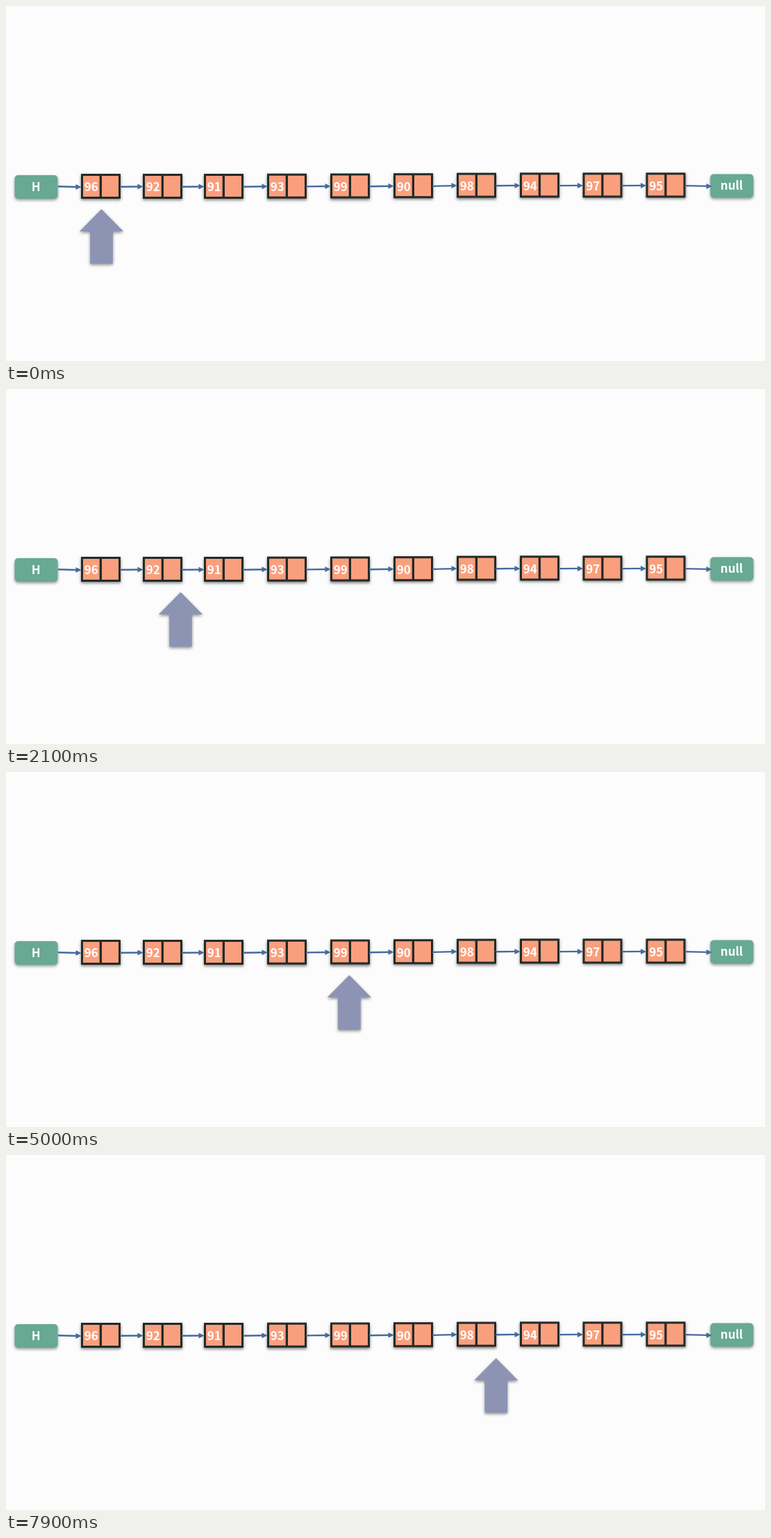
An HTML page with a canvas for the animation above (8000 ms loop, 1093 by 512 pixels).

```html
<!DOCTYPE html>
<html lang="en">
<head>
<meta charset="utf-8">
<title>Linked list traversal</title>
<style>
  html, body { margin: 0; width: 100%; height: 100%; overflow: hidden; background: #fcfcfc; }
  canvas { display: block; }
</style>
</head>
<body>
<canvas id="stage" width="1093" height="512"></canvas>
<script>
const ctx = document.getElementById('stage').getContext('2d');

const LOOP = 8000;
const STEP = 100;
const MOVE = 1000;
const BOX_W = 57;
const BOX_H = 36;
const FONT = '"Noto Sans CJK SC", "Noto Sans CJK JP", "Noto Sans", sans-serif';

const nodes = [
  { value: 96, x: 108, y: 242 },
  { value: 92, x: 197, y: 242 },
  { value: 91, x: 285, y: 242 },
  { value: 93, x: 376, y: 241.7 },
  { value: 99, x: 467, y: 241.5 },
  { value: 90, x: 558, y: 241.2 },
  { value: 98, x: 649, y: 240.6 },
  { value: 94, x: 740, y: 240.4 },
  { value: 97, x: 830.5, y: 240.4 },
  { value: 95, x: 921.5, y: 240.4 }
];

// Pointer rest positions and the time each hop to the next one begins.
const stops = [137.5, 225.5, 313.2, 405.2, 495, 586.5, 677.5, 768.5];
const starts = [506, 1715, 2940, 4060, 5250, 6431, 7506];

function withShadow(alpha, blur, offset, draw) {
  ctx.save();
  ctx.shadowColor = `rgba(0, 0, 0, ${alpha})`;
  ctx.shadowBlur = blur;
  ctx.shadowOffsetY = offset;
  draw();
  ctx.restore();
}

function label(text, x, baseline) {
  ctx.font = `bold 17px ${FONT}`;
  ctx.textAlign = 'center';
  ctx.fillStyle = '#fff';
  ctx.fillText(text, x, baseline);
}

function drawEnd(text, x, y) {
  withShadow(0.42, 4, 2, () => {
    ctx.fillStyle = '#67a993';
    ctx.beginPath();
    ctx.roundRect(x, y, 62, 34, 5);
    ctx.fill();
  });
  label(text, x + 30.7, y + 22.7);
}

function drawNode({ value, x, y }) {
  withShadow(0.5, 4, 2, () => {
    ctx.fillStyle = '#222b28';
    ctx.fillRect(x, y, BOX_W, BOX_H);
  });
  ctx.fillStyle = '#fa9f7d';
  ctx.fillRect(x + 3, y + 3, 23.7, BOX_H - 6);
  ctx.fillRect(x + 30, y + 3, 24, BOX_H - 6);
  label(value, x + 14.7, y + 25.3);
}

function drawLink(x1, y1, x2, y2) {
  ctx.strokeStyle = ctx.fillStyle = '#456a9c';
  ctx.lineWidth = 2.4;
  ctx.beginPath();
  ctx.moveTo(x1, y1);
  ctx.lineTo(x2 - 5, y2);
  ctx.stroke();
  ctx.beginPath();
  ctx.moveTo(x2, y2);
  ctx.lineTo(x2 - 8, y2 - 4);
  ctx.lineTo(x2 - 8, y2 + 4);
  ctx.fill();
}

function drawPointer(x) {
  const half = [[0, 293], [31.5, 325], [16.3, 325], [16.3, 371.5]];
  const mirrored = half.map(([dx, y]) => [-dx, y]).reverse();
  withShadow(0.45, 4, 2, () => {
    ctx.fillStyle = '#8d93b3';
    ctx.beginPath();
    for (const [dx, y] of [...half, ...mirrored]) ctx.lineTo(x + dx, y);
    ctx.fill();
  });
}

function ease(u) {
  return u < 0.5 ? 2 * u * u : 1 - 2 * (1 - u) ** 2;
}

function pointerX(time) {
  return starts.reduce((x, start, i) => {
    const u = Math.min(1, Math.max(0, (time - start) / MOVE));
    return x + (stops[i + 1] - stops[i]) * ease(u);
  }, stops[0]);
}

function drawScene(time) {
  ctx.fillStyle = '#fcfcfc';
  ctx.fillRect(0, 0, 1093, 512);
  drawEnd('H', 12.5, 244);
  nodes.forEach(drawNode);
  drawEnd('null', 1014.3, 242.5);

  drawLink(75, 260.3, 108.5, 261);
  nodes.forEach((node, i) => {
    const next = nodes[i + 1] || { x: 1016, y: 241.4 };
    drawLink(node.x + BOX_W - 1, node.y + 18.7, next.x + 0.5, next.y + 18.5);
  });
  drawPointer(pointerX(time));
}

function tick() {
  const time = performance.now() % LOOP;
  drawScene(Math.floor(time / STEP) * STEP);
  requestAnimationFrame(tick);
}

tick();
</script>
</body>
</html>
```
